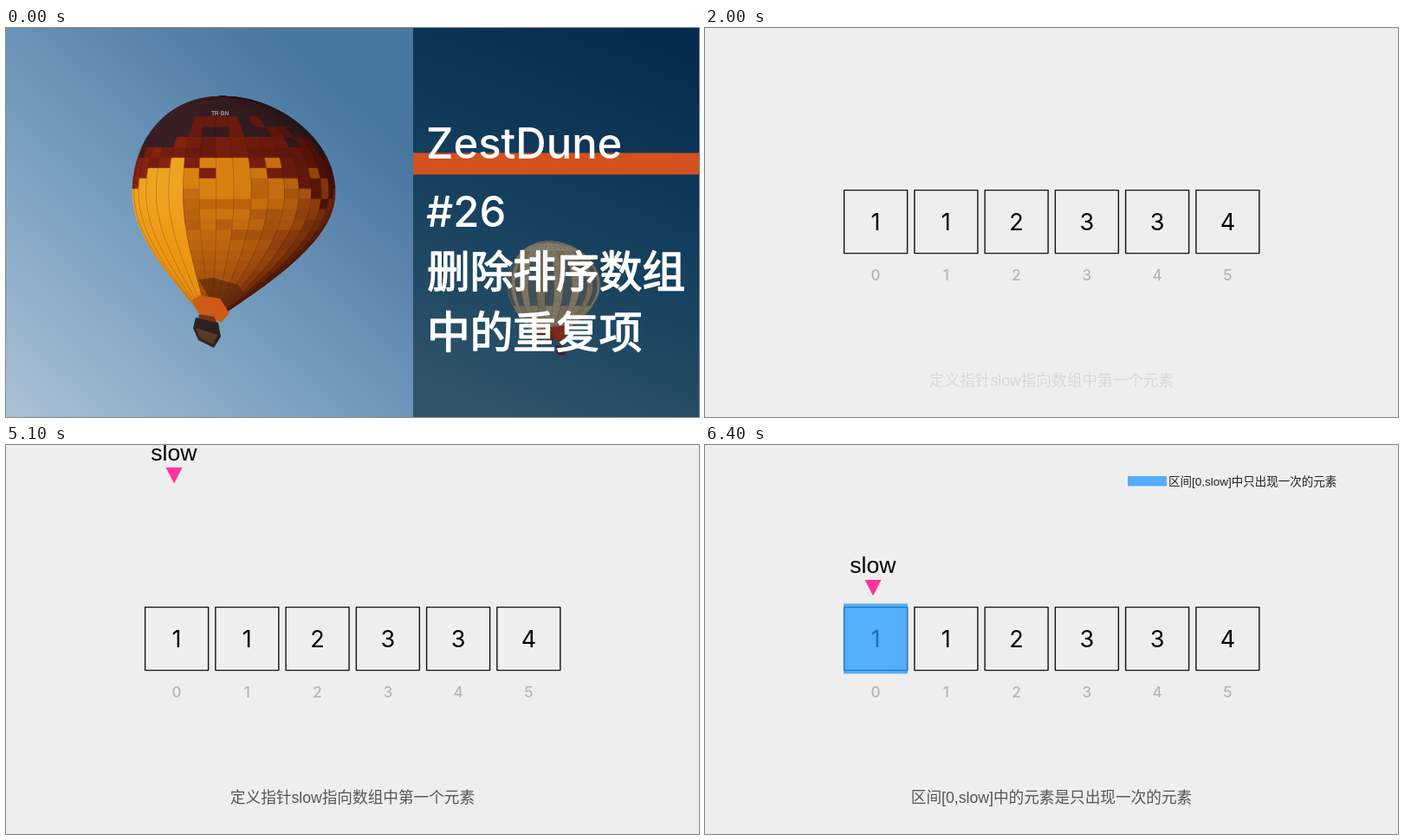
An HTML page with a canvas for the animation above (8000 ms loop, 800 by 450 pixels).

```html
<!DOCTYPE html>
<html lang="zh">
<head>
<meta charset="utf-8">
<style>
  html, body { margin: 0; width: 100%; height: 100%; overflow: hidden; background: #eee; }
  canvas { display: block; width: 100%; height: 100%; }
</style>
</head>
<body>
<canvas id="stage" width="800" height="450"></canvas>
<script>
const ctx = document.getElementById('stage').getContext('2d');
const LOOP = 8000, STEP = 50;
const HAN = '"Noto Sans CJK SC", "Noto Sans CJK", sans-serif';
const PLAIN = '"Liberation Sans", ' + HAN;
const ROUND = 'Inter, ' + HAN;
const clamp = v => Math.max(0, Math.min(1, v));
const noise = (i, j) => { const n = Math.sin(i * 127.1 + j * 311.7) * 43758.5453; return n - Math.floor(n); };

function rect(x, y, w, h, fill) {
  ctx.fillStyle = fill;
  ctx.fillRect(x, y, w, h);
}

function poly(points, fill) {
  ctx.beginPath();
  points.forEach(([x, y]) => ctx.lineTo(x, y));
  ctx.closePath();
  ctx.fillStyle = fill;
  ctx.fill();
}

function text(str, x, y, font, fill, align = 'center') {
  ctx.font = font;
  ctx.textAlign = align;
  ctx.fillStyle = fill;
  ctx.fillText(str, x, y);
}

function gradient(x0, y0, x1, y1, ...colors) {
  const g = ctx.createLinearGradient(x0, y0, x1, y1);
  colors.forEach((c, i) => g.addColorStop(i / (colors.length - 1), c));
  return g;
}

// Point on the envelope: a is the angle around it, y the height
function envelope(a, y) {
  const up = (190 - y) / 111, down = (y - 190) / 140;
  const half = y < 190 ? 117 * Math.sqrt(Math.max(0, 1 - up * up)) : 14 + 103 * Math.cos(down * Math.PI / 2);
  const mid = y < 190 ? 263 - 13 * up * up : 263 - 25 * down * down;
  return [mid + half * Math.sin(a), y];
}

function seam(a, y0, y1) {
  return Array.from({ length: 9 }, (_, k) => envelope(a, y0 + (y1 - y0) * k / 8));
}

function drawEnvelope(gores, rows, colorAt) {
  const angle = i => (i / gores - 0.5) * Math.PI;
  const height = j => 79 + 250 * j / rows;
  for (let i = 0; i < gores; i++) {
    for (let j = 0; j < rows; j++) {
      const a0 = angle(i), a1 = angle(i + 1), y0 = height(j), y1 = height(j + 1);
      const color = colorAt(i, j, Math.sin((a0 + a1) / 2), (y0 + y1) / 2);
      poly([...seam(a0, y0, y1), ...seam(a1, y1, y0)], color);
      ctx.strokeStyle = color;
      ctx.lineWidth = 0.7;
      ctx.stroke();
    }
  }
  ctx.strokeStyle = 'rgba(60,15,5,.22)';
  ctx.lineWidth = 1;
  for (let i = 1; i < gores; i++) {
    ctx.beginPath();
    for (let y = 79; y <= 329; y += 5) ctx.lineTo(...envelope(angle(i), y));
    ctx.stroke();
  }
}

// Sunlit from the left, falling into shade towards the right and below
function fireColor(i, j, u, y) {
  const r = noise(i, j), down = Math.max(0, (y - 190) / 140), right = Math.max(0, u);
  const lit = u < -0.45 ? 1 - 0.15 * down : clamp(0.8 - 0.25 * right - 0.45 * right ** 4 - 0.4 * down);
  const dark = `hsl(350,30%,${10 + 7 * lit}%)`;
  const red = k => `hsl(${6 + 4 * lit},80%,${12 + 17 * lit * k}%)`;
  const orange = k => `hsl(${16 + 22 * lit * k},86%,${17 + 36 * lit * k}%)`;
  const level = y - 36 * u ** 4;
  if (level < 106) return dark;
  if (level < 124) return r < 0.5 ? dark : red(0.8);
  if (level < 150) return red(r < 0.25 ? 0.8 : 1);
  if (level < 180) return r < 0.4 && u > -0.5 ? red(1.1) : orange(1);
  return orange(r < 0.3 && level < 250 && u > -0.45 ? 0.84 : 1);
}

function paleColor(i, j, u, y) {
  if (y > 300) return '#5e2a20';
  if (y < 100) return '#85806f';
  const drop = y > 130 && y < 245 && i % 2;
  return drop ? '#424f57' : i % 3 ? '#7d7560' : '#736b55';
}

function drawFireBalloon() {
  drawEnvelope(18, 21, fireColor);
  poly([[222, 291], [240, 289], [268, 297], [274, 307], [254, 322], [236, 314]], 'rgba(80,35,12,.6)');
  poly([[215, 315], [223, 309], [247, 313], [258, 330], [249, 340], [238, 337], [222, 330]], '#cf5916');
  poly([[223, 331], [240, 334], [246, 345], [221, 341]], '#6d3516');
  poly([[219, 335], [245, 341], [248, 357], [240, 370], [222, 361], [216, 347]], '#2e2220');
  poly([[219, 347], [244, 355], [239, 366], [223, 358]], '#5a3a24');
  text('TR·BN', 247, 101, '700 6.5px ' + PLAIN, '#a59a96');
}

function drawPaleBalloon() {
  ctx.save();
  ctx.translate(512, 210.5);
  ctx.scale(0.46, 0.46);
  drawEnvelope(16, 20, paleColor);
  ctx.restore();
  poly([[627, 346], [648, 344], [645, 361], [635, 363]], '#7e2a1e');
  poly([[635, 367], [647, 368], [645, 379], [636, 377]], '#421f22');
}

function titleLine(str, x, y, font, weight) {
  text(str, x, y, font, '#fff', 'left');
  if (!weight) return;
  ctx.strokeStyle = '#fff';
  ctx.lineJoin = 'round';
  ctx.lineWidth = weight;
  ctx.strokeText(str, x, y);
}

function drawCover() {
  rect(0, 0, 470, 450, gradient(20, 450, 370, 60, '#a9bfd4', '#739bbe', '#47769f'));
  rect(470, 0, 330, 450, gradient(740, 0, 560, 450, '#052b4e', '#143f5d', '#30546b'));
  drawFireBalloon();
  drawPaleBalloon();
  rect(470, 144.5, 330, 25, '#d4521f');
  const latin = '500 49px ' + ROUND, han = '49.7px ' + HAN;
  titleLine('ZestDune', 485, 151, latin);
  titleLine('#26', 485, 230, latin);
  titleLine('删除排序数组', 486, 299.5, han, 1.5);
  titleLine('中的重复项', 486, 369.5, han, 1.5);
}

function drawArray() {
  [1, 1, 2, 3, 3, 4].forEach((value, i) => {
    const x = 160.6 + 81.25 * i;
    ctx.strokeStyle = '#111';
    ctx.lineWidth = 1.4;
    ctx.strokeRect(x, 187.6, 73, 73);
    text(value, x + 36.5, 233.5, '400 27px ' + ROUND, '#000');
    text(i, x + 36.5, 292, '500 17px ' + ROUND, '#b4b4b4');
  });
}

function drawPointer(tip) {
  poly([[184.5, tip - 18.5], [203.5, tip - 18.5], [194, tip]], '#ff3399');
  text('slow', 193.8, tip - 26.5, '26.5px ' + PLAIN, '#000');
}

function caption(str, alpha = 1) {
  ctx.globalAlpha = alpha;
  text(str, 400, 413.5, '17.65px ' + PLAIN, '#555');
  ctx.globalAlpha = 1;
}

function drawRange() {
  const blue = 'rgba(31,153,255,.75)';
  rect(160, 183.5, 74, 81, blue);
  rect(488, 36, 45, 11.5, blue);
  text('区间[0,slow]中只出现一次的元素', 535, 46.5, '13.5px ' + PLAIN, '#222', 'left');
}

function draw(time) {
  if (time < 1130) return drawCover();
  const t = Math.floor(time / STEP) * STEP;
  rect(0, 0, 800, 450, '#eee');
  drawArray();
  if (t >= 4400) {
    const left = 1 - clamp((t - 5050) / 450);
    drawPointer(174.5 - 164.5 * left * left);
  }
  if (t < 6400) {
    caption('定义指针slow指向数组中第一个元素', clamp((t - 1900) / 750));
  } else {
    drawRange();
    caption('区间[0,slow]中的元素是只出现一次的元素');
  }
}

const start = performance.now();
function frame() {
  draw((performance.now() - start) % LOOP);
  requestAnimationFrame(frame);
}
frame();
</script>
</body>
</html>
```
